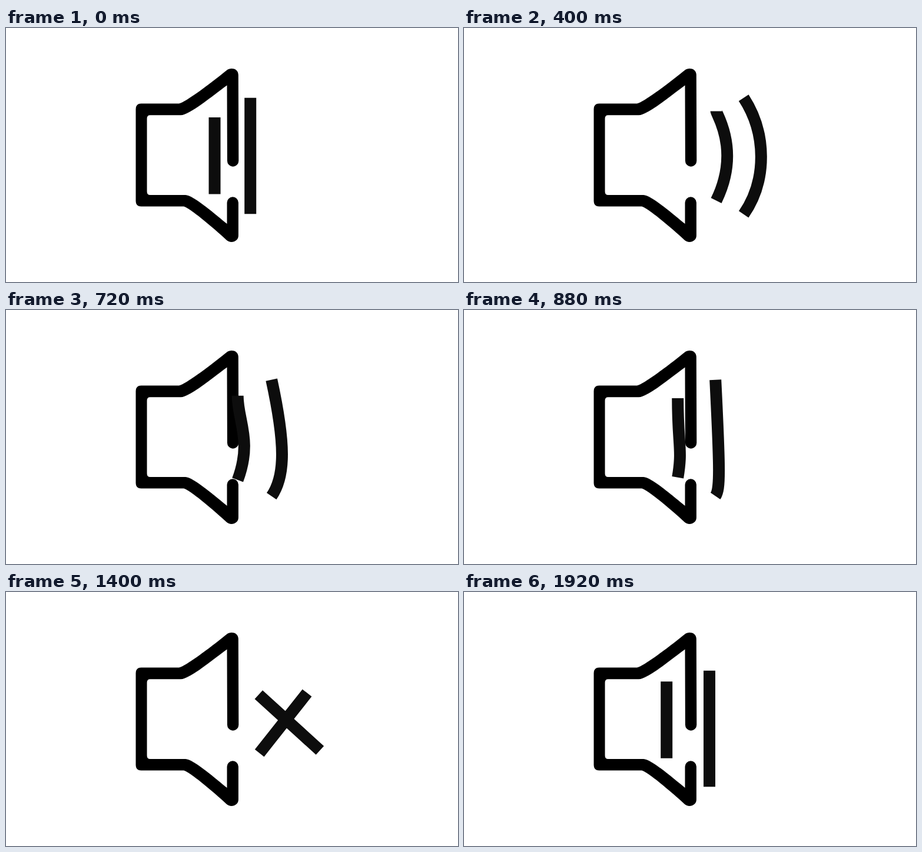
Write an HTML page that moves like this. It is 768 by 432 pixels and loops after 2.16 s.

```html
<!DOCTYPE html>
<html lang="en">
<head>
<meta charset="utf-8">
<title>Speaker</title>
<style>
  html, body { margin: 0; width: 100%; height: 100%; overflow: hidden; background: #fff; }
  svg { display: block; width: 768px; height: 432px; }
  .bar { fill: none; stroke: #0d0d0d; stroke-width: 20; }
</style>
</head>
<body>
<svg viewBox="0 0 768 432">
  <path d="M229.5 128.5H294C305 126 344 97 375.5 71.5C380 67.5 394.5 67 394.8 80L395.3 226
    A9.7 9.7 0 0 1 375.9 226L375.5 97.5C350 116 312 148 297 148.3H245Q239.5 148.3 239.5 154
    V278Q239.5 284 245 284H305C318 284 358 319 375.5 333V297A9.7 9.7 0 0 1 394.9 297V353
    C394.9 364 381 367 374.5 360.5C350 338 312 306 302 303.6H229.5Q220.5 303.6 220.5 294.5
    V138Q220.5 128.5 229.5 128.5Z"/>
  <path class="bar" id="inner"/>
  <path class="bar" id="outer"/>
</svg>
<script>
const LOOP = 2160, STEP = 40, PHASE = 480;
const inner = document.getElementById('inner');
const outer = document.getElementById('outer');

const mix = (a, b, k) => a + (b - a) * k;

// Vertical arc: both ends share x, handles are relative to their ends
function arc(path, x, top, bottom, [ax, ay], [bx, by]) {
  path.setAttribute('d',
    `M${x} ${top}C${x + ax} ${top + ay} ${x + bx} ${bottom + by} ${x} ${bottom}`);
}

// Straight bar, turned clockwise from vertical
function bar(path, { x, y, length, turn }) {
  const angle = turn * Math.PI / 180;
  const dx = Math.sin(angle) * length / 2, dy = Math.cos(angle) * length / 2;
  path.setAttribute('d', `M${x + dx} ${y - dy}L${x - dx} ${y + dy}`);
}

// Bars bend outwards past the resting wave (bend 1), then straighten again
function waves(t) {
  const bend = 1.2 * (1 - Math.abs(t / PHASE - 1));
  const shift = Math.max(0, 87 - 0.19 * Math.abs(t - 468));
  arc(inner, 354.5 + shift, 152 - 10.5 * bend, 282.5 + 11 * bend,
    [0, 100 - 95 * bend], [42 * bend, -40 - 46 * bend]);
  arc(outer, 415.2 + 60 * bend, 118.7, 316.3 + 0.6 * bend,
    [39 * bend, 180 - 120 * bend], [40 * bend, -58 * bend]);
}

// Start, crossed and upright poses, one phase apart
const innerPoses = [
  { x: 354.5, y: 217.3, length: 130.4, turn: 0 },
  { x: 481.7, y: 223.3, length: 130.4, turn: 41.8 },
  { x: 344.2, y: 217.5, length: 130.4, turn: 180 },
];
const outerPoses = [
  { x: 422.4, y: 222, length: 197.2, turn: 0 },
  { x: 486.7, y: 222, length: 135.8, turn: 144.4 },
  { x: 417, y: 232.6, length: 197.5, turn: 180 },
];

function poseAt(poses, phase) {
  const i = Math.min(1, Math.floor(phase));
  const k = Math.min(1, phase - i);
  const pose = {};
  for (const key in poses[i]) pose[key] = mix(poses[i][key], poses[i + 1][key], k);
  return pose;
}

function cross(t) {
  bar(inner, poseAt(innerPoses, t / PHASE));
  bar(outer, poseAt(outerPoses, t / PHASE));
}

const start = performance.now();
function draw() {
  const elapsed = (performance.now() - start) % LOOP;
  const t = Math.floor(elapsed / STEP) * STEP;
  if (t < 2 * PHASE) waves(t);
  else cross(t - 2 * PHASE);
  requestAnimationFrame(draw);
}
draw();
</script>
</body>
</html>
```
